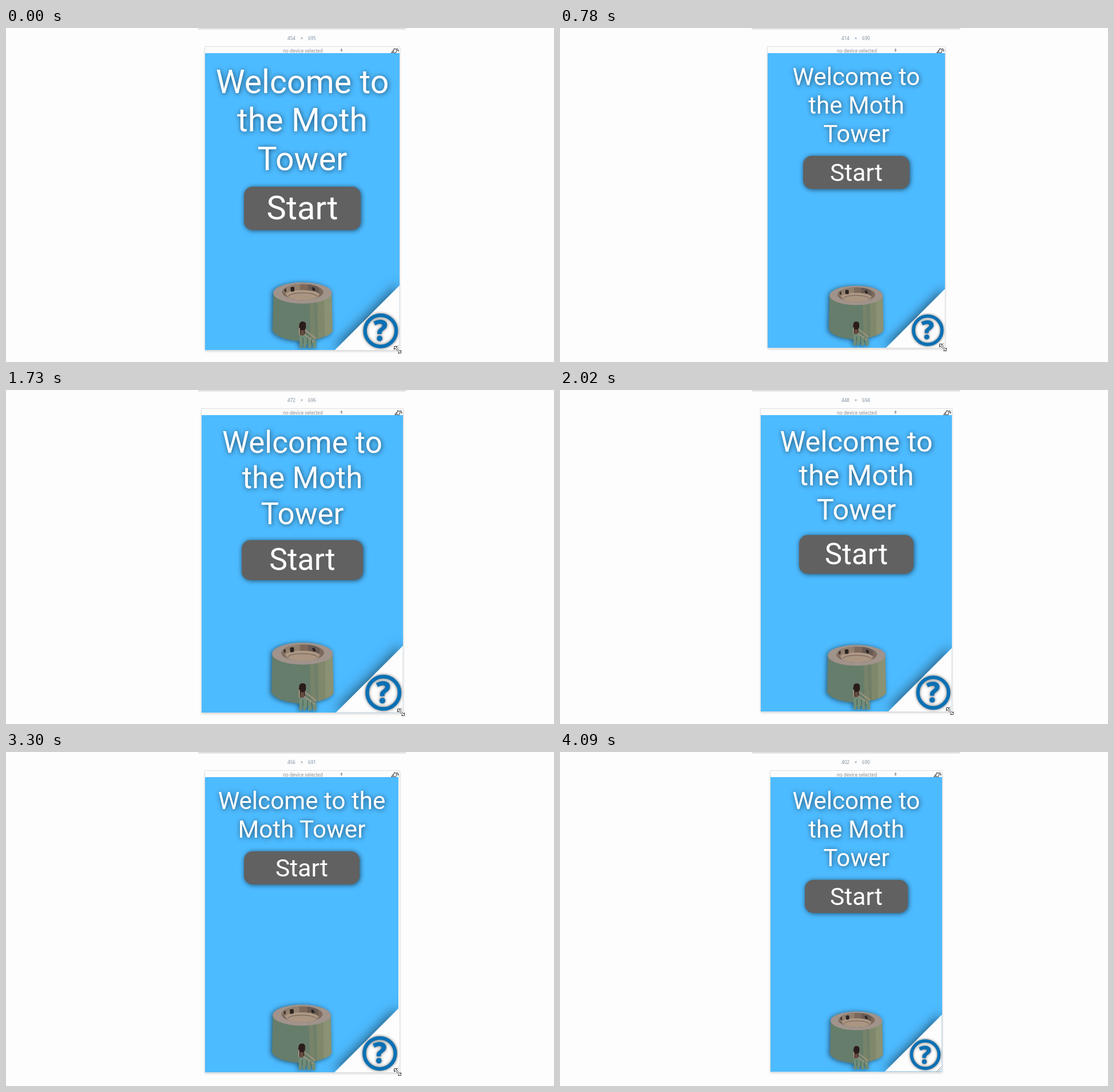
An HTML page that plays this animation: 958x585 px, repeating every 4330 ms.

```html
<!DOCTYPE html>
<html lang="en">
<head>
<meta charset="utf-8">
<title>Responsive welcome page</title>
<style>
  html, body { margin: 0; width: 100%; height: 100%; overflow: hidden; background: #fdfdfd; }
  #stage { position: relative; width: 958px; height: 585px; overflow: hidden; font: 8.15px/12px "Noto Sans", "Open Sans", sans-serif; color: #8a8a8a; }
  #stage div, #stage svg { position: absolute; }
  svg { overflow: visible; }

  #bar { left: 336px; top: -8px; width: 363px; height: 9px; background: #e4e4e4; box-shadow: 0 1px 2px #0003; }
  .size { top: 12px; width: 40px; text-align: center; color: #7f90a0; }
  #cols { left: 479px; }
  #by { left: 497px; }
  #rows { left: 515px; }

  #frame { top: 33px; background: #fcfcfc; box-shadow: 0 0 0 1px #e0e0e0, 0 2px 4px #0003; }
  #device { left: 469px; top: 34px; width: 100px; text-align: center; }
  #arrows { left: 584px; top: 36px; }
  #rotate { right: 1px; top: 1px; }

  #page { top: 44px; overflow: hidden; background: #4dbbff; --w: 339px; --f: 58px; }
  h1, #start { font: 400 var(--f)/1.172 Roboto, sans-serif; color: #fff; text-align: center; }
  h1 { margin: 16.5px -60px 0; font-size: calc(var(--f) * .988); line-height: 1.186; white-space: pre; text-shadow: 1px 1px 9px #0009; }
  #page #start { position: relative; box-sizing: border-box; width: 60%; margin: 13.8px auto 0; padding: 3.7px 0; border-radius: 15px; background: #616161; box-shadow: 1px 1px 9px #0009; }
  #tower { left: 50%; bottom: 4px; width: calc(var(--w) * .307); margin-left: calc(var(--w) * -.1535); filter: drop-shadow(-2px 1px 4px #0008); }
  #corner { right: 0; bottom: 0; width: calc(var(--w) * .332); }
  #fold { filter: drop-shadow(-2px -2px 9px #0008); }
  #help { filter: drop-shadow(0 0 2.2px #0009); }
  #help text { font: 700 44px "Open Sans", "Noto Sans", sans-serif; text-anchor: middle; stroke: #0a70b4; }
</style>
</head>
<body>
<div id="stage">
  <div id="bar"></div>
  <div id="cols" class="size"></div>
  <div id="by" class="size">×</div>
  <div id="rows" class="size"></div>

  <div id="frame">
    <svg id="rotate" width="14" height="12" viewBox="0 0 14 12" fill="none" stroke="#333" stroke-width="1">
      <rect x="4.5" y="2.6" width="5" height="7" rx=".6" transform="rotate(20 7 6)"/>
      <path d="M3.6 5.2Q1.2 6.4 1.6 10.2M.4 8.8l1.3 1.6 1.8-1M10 2q3.2-.4 2.6 4.6M11.6 5.4l1 1.4 1.2-1.2"/>
    </svg>
  </div>
  <div id="device">no device selected</div>
  <svg id="arrows" width="5" height="6" viewBox="0 0 5 6" fill="#777"><path d="M2.5 0L4.5 2.2H.5zM2.5 5.4L4.5 3.2H.5z"/></svg>

  <div id="page">
    <h1></h1>
    <div id="start">Start</div>

    <svg id="tower" viewBox="0 0 104 115">
      <path fill="#667d6b" d="M1.5 20L0 85Q8 99 45 103L68 102 72 30z"/>
      <path fill="#6f7f69" d="M64 34L66 102 80 99 79 30z"/>
      <path fill="#7f886b" d="M78 30L79 99.5 92 95 91 26z"/>
      <path fill="#8a9273" d="M90 28L91 95.5Q102 91 104.5 86L103 20z"/>
      <path fill="#77846a" d="M65 34l6-2 4 68-8 2z"/>
      <ellipse cx="52.2" cy="19" rx="51" ry="18.5" fill="#a0938b"/>
      <ellipse cx="52.5" cy="17.5" rx="36" ry="14" fill="#7d695c"/>
      <path fill="#92806f" d="M25 9.5Q35 4 48 3.6V14L27 23Q17 18 18 14z"/>
      <path fill="#675a53" d="M62 4q12 1 19 6v10l-19-6z"/>
      <ellipse cx="52.5" cy="23" rx="28" ry="8.5" fill="#a99582"/>
      <path fill="none" stroke="#c2a890" d="M23 22q6-7 29-7t30 7"/>
      <path fill="none" stroke="#6e5c50" d="M27 25q5-6 25-6t26 6"/>
      <path fill="#2b2321" d="M31 9.5l4-1.5 3 1v7l-6 1zM68 10l4-1 3 5-4 2z"/>
      <path fill="#3f342f" d="M20 13l4-2v6l-3 1z"/>
      <path fill="#7c6355" d="M47 79h10v14H47z"/>
      <path fill="#2a1c1a" d="M47 72l3-3h5l3 3v8l-2 3v9h-8v-9l-2-3z"/>
      <path fill="#654c41" d="M49 84h6v8h-6z"/>
      <path fill="#708d79" d="M47 95l9-2 20 9v13h-6v-9l-3 9h-5l-1-9-4 9h-3l-1-7-2 7h-4z"/>
      <path fill="none" stroke="#b39a87" stroke-width="1.5" d="M57 84l19 15M55 91l17 13M47 80v13"/>
      <path fill="none" stroke="#4e6859" stroke-width="1.5" d="M53 97v11M61 97v10M68 100v9"/>
    </svg>

    <svg id="corner" viewBox="0 0 100 100">
      <path id="fold" fill="#fdfdfd" d="M100 0V100H0z"/>
      <g id="help" fill="#0a70b4">
        <circle cx="70.8" cy="70.4" r="24.2" fill="none" stroke="#0a70b4" stroke-width="5.5"/>
        <text x="70.8" y="86">?</text>
      </g>
    </svg>
  </div>

  <svg id="grip" width="9" height="9" viewBox="0 0 9 9" stroke="#777" stroke-width=".9"><path d="M.5 8.5l8-8M4 8.5L8.5 4"/></svg>
  <svg id="cursor" width="13" height="13" viewBox="0 0 13 13" fill="#fff" stroke="#222" stroke-width=".9">
    <path d="M.5 .5h5l-1.7 1.7 7 7 1.7-1.7v5h-5l1.7-1.7-7-7L.5 5.5z"/>
  </svg>
</div>

<script>
const LOOP = 4330, ZOOM = 0.7467, MIDDLE = 518, TOP = 45;

// Moments at which the dragged window is redrawn.
const ticks = [0, 160, 320, 470, 620, 780, 940, 1100, 1250, 1390, 1550, 1710, 1870, 2020,
  2170, 2330, 2490, 2640, 2800, 2970, 3130, 3300, 3470, 3630, 3780, 3940, 4090];

// time, viewport width, viewport height, title size
const drag = [
  [0, 454, 695, 58],
  [320, 488, 708, 58],
  [780, 414, 690, 42.7],
  [1250, 508, 700, 57.2],
  [2020, 448, 694, 51.2],
  [2640, 480, 695, 54.7],
  [2970, 412, 690, 42.7],
  [3300, 456, 691, 42.7],
  [3630, 479, 694, 42.7],
  [4090, 402, 690, 42.7]
];

const $ = id => document.getElementById(id);
const title = document.querySelector("h1");

function sample(t) {
  const i = drag.findIndex(k => k[0] >= t);
  if (i < 1) return drag[i < 0 ? drag.length - 1 : 0].slice(1);
  const a = drag[i - 1], b = drag[i], p = (t - a[0]) / (b[0] - a[0]);
  return a.slice(1).map((v, n) => v + (b[n + 1] - v) * p);
}

function place(el, x, y) {
  el.style.left = x + "px";
  el.style.top = y + "px";
}

function draw(step) {
  const [w, h, size] = sample(ticks[step]);
  const growing = step > 0 && w > sample(ticks[step - 1])[0];
  const half = w * ZOOM / 2;
  const left = Math.round(MIDDLE - half - 0.2);
  const right = Math.round(MIDDLE + half);
  const bottom = Math.round(TOP + h * ZOOM);
  const pageWidth = right - left - (growing ? 2 : 0); // content trails the edge

  $("cols").textContent = Math.round(w);
  $("rows").textContent = Math.round(h);

  const frame = $("frame").style, page = $("page").style;
  frame.left = page.left = left + "px";
  frame.width = right - left + "px";
  frame.height = bottom - 33 + "px";
  page.width = pageWidth + "px";
  page.height = bottom - 44 + "px";
  page.setProperty("--w", pageWidth + "px");
  page.setProperty("--f", size + "px");

  const wide = size * 6.85 < pageWidth * 0.9;
  title.textContent = wide ? "Welcome to the\nMoth Tower" : "Welcome to\nthe Moth\nTower";

  place($("grip"), right - 10, bottom - 9.5);
  place($("cursor"), right - 10, bottom - 7.5);
  $("cursor").style.display = step === ticks.length - 1 ? "none" : "";
}

let shown = -1;
function tick() {
  const t = performance.now() % LOOP;
  const step = ticks.filter(s => s <= t).length - 1;
  if (step !== shown) draw(shown = step);
  requestAnimationFrame(tick);
}
tick();
</script>
</body>
</html>
```
